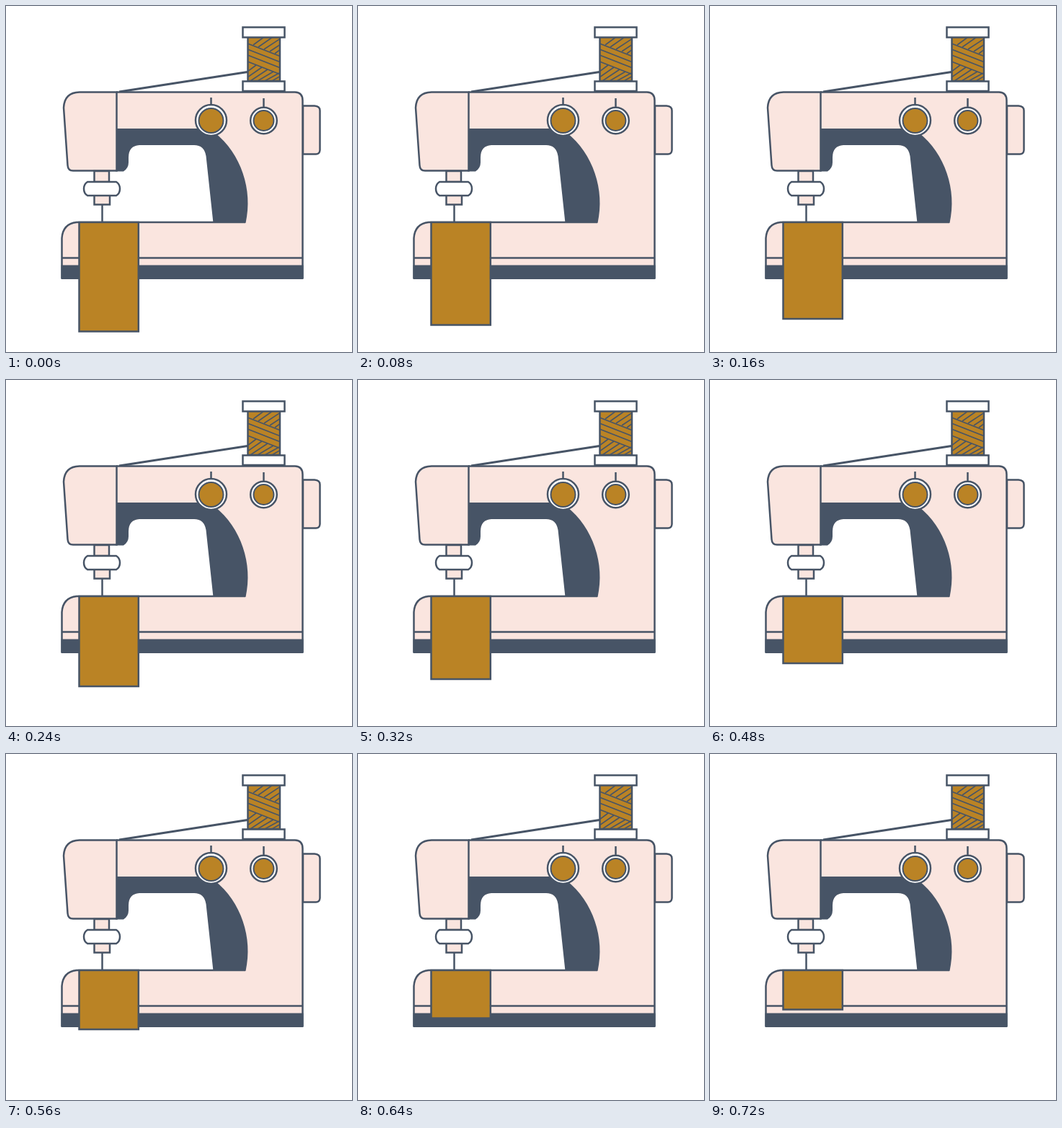
These frames come from a looping animation (480x480 px, 800 ms). An HTML page:

```html
<!DOCTYPE html>
<html>
<head>
<meta charset="utf-8">
<style>
  html, body { margin: 0; height: 100%; overflow: hidden; background: #fff; }
  svg { display: block; width: 100vw; height: 100vh; stroke: #475466; stroke-width: 2.5; fill: none; }
  .pink { fill: #fae5df; }
  .gold { fill: #ba8325; }
  .white { fill: #fff; }
  .dark { fill: #475466; stroke: none; }
</style>
</head>
<body>
<svg viewBox="0 0 480 480">
  <defs><clipPath id="reel"><path d="M336 43H380V104H336Z"/></clipPath></defs>

  <path d="M157 119L335 91.5" stroke-width="2.8"/>
  <g id="spool">
    <path class="gold" d="M335.5 43H380V104H335.5Z"/>
    <g clip-path="url(#reel)" stroke-width="1.6">
      <path d="M335 52L381 70M335 60L381 78M335 68L381 86M335 77L381 95"/>
      <path d="M343 54L358 43M350 57L370 43M358 60L381 45M366 63L381 53M373 66L381 60"/>
      <path d="M335 91L347 82M335 99L355 85M339 104L363 88M349 104L371 91M359 104L379 93M369 104L381 97"/>
    </g>
    <path class="white" d="M328.5 29.5H386.5V43.5H328.5ZM328.5 104.5H386.5V118H328.5Z"/>
  </g>

  <path class="pink" d="M412 138.5H428Q435.5 139 435.5 145V200Q435 205.5 430 205.5H412Z"/>
  <path class="pink" d="M153 119.5H401Q411.5 120 411.5 131V377.5H77.5V322Q79 302 98 300H288L278 208Q275 193 261 193H185Q170 194 170 210L153 229Z" stroke="none"/>
  <path class="dark" d="M152 170H283L290 176C326 205 343 255 332.500 301H287.500L277.500 208Q275 193 261 193H185Q170 194 170 210V217Q170 225 163 229.500H152Z"/>
  <path class="dark" d="M76.500 359.500H412.500V379H76.500Z"/>
  <path d="M153 119.500H401Q411.500 120 411.500 131V378M332 300H98Q79 302 77.500 322V378M77 349.500H412"/>
  <path class="pink" d="M153.500 119.500H102Q81 120 80 141L85.500 221Q86 228.500 93 228.500H153.500Z"/>

  <path d="M284.500 127V138M357.500 128V142"/>
  <g class="white">
    <circle cx="284.500" cy="158.500" r="21.500"/>
    <circle cx="357.500" cy="159" r="18.300"/>
  </g>
  <g class="gold" stroke-width="2">
    <circle cx="284.500" cy="159" r="17"/>
    <circle cx="357.500" cy="159" r="14"/>
  </g>

  <path class="pink" d="M122.500 229H143V244H122.500ZM122.500 262H144V275.500H122.500Z"/>
  <path class="white" d="M113 244H153Q158 247 158 253.500T153 263H113Q108 260 108 253.500T113 244Z"/>
  <path d="M133.500 276V300"/>
  <rect id="cloth" class="gold" x="101.500" y="300" width="82.300" height="151.500"/>
</svg>
<script>
  const cloth = document.getElementById('cloth');
  const hems = [451.5, 442.5, 434, 425, 415, 404.5, 393, 382, 366.5, 354.5];
  const stepMs = 80;
  const loopMs = 800;

  function draw() {
    const step = Math.floor(performance.now() % loopMs / stepMs);
    cloth.setAttribute('height', hems[step] - 300);
    requestAnimationFrame(draw);
  }
  draw();
</script>
</body>
</html>
```
